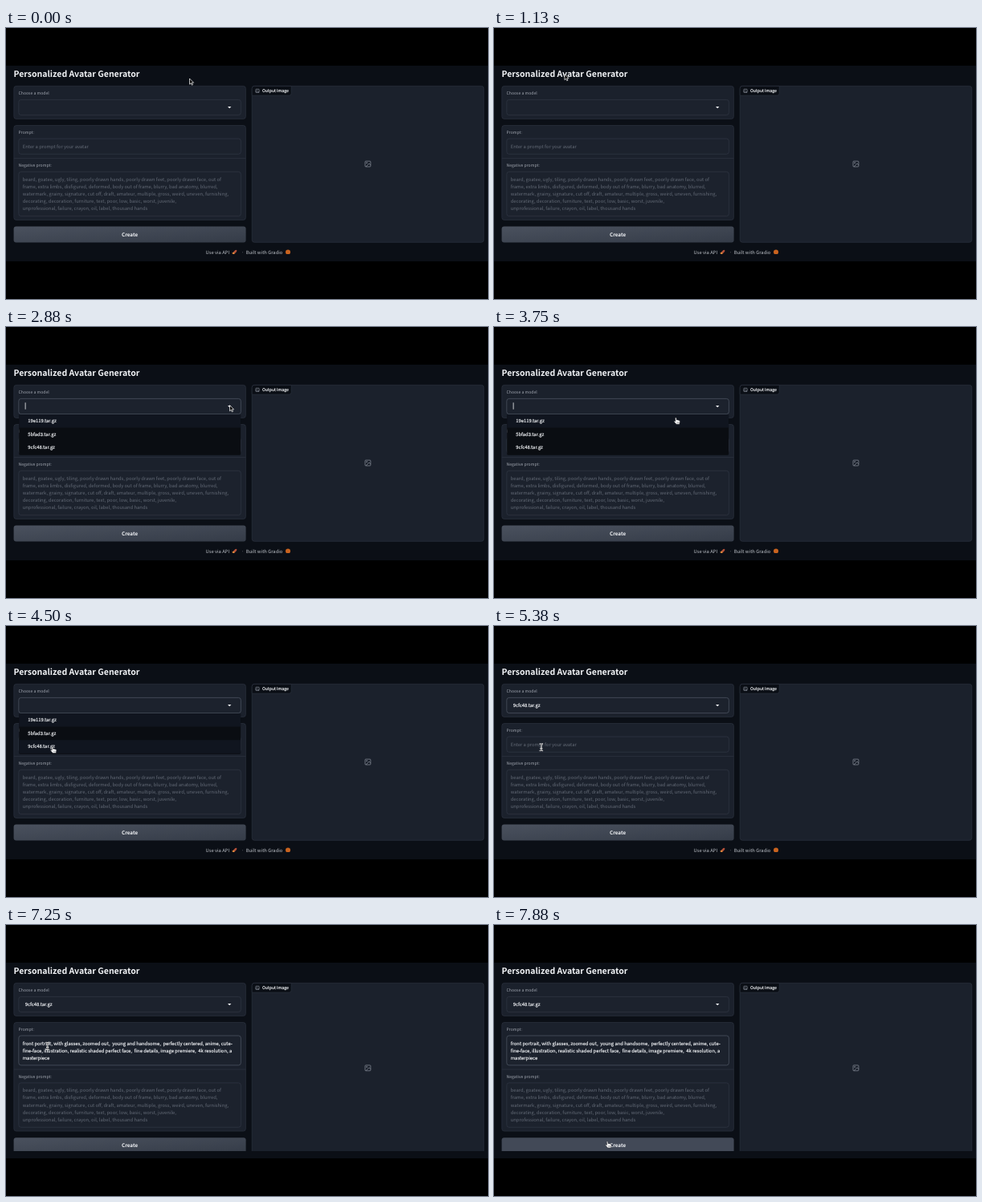
Write an HTML page that moves like this. It is 600 px wide and 338 px high and loops after 8000 ms.

```html
<!DOCTYPE html>
<html lang="en">
<head>
<meta charset="utf-8">
<title>Personalized Avatar Generator</title>
<style>
  html, body { margin: 0; width: 100%; height: 100%; overflow: hidden; background: #000; }
  svg { display: block; width: 600px; height: 338px; }
  text {
    font: 5.85px "Noto Sans CJK JP", "Noto Sans CJK SC", "Noto Sans CJK", "Open Sans", sans-serif;
    text-rendering: geometricPrecision;
    white-space: pre;
    fill: #f1f3f6;
  }
  .title { font-size: 10.5px; font-weight: 700; }
  .label { font-size: 5.1px; fill: #a3a8b2; }
  .hint { fill: #636a76; }
  .strong { stroke: #f1f3f6; stroke-width: .17px; }
  .foot { fill: #bcc0c7; }
  .create { font-size: 6.3px; font-weight: 700; text-anchor: middle; }
  .card { fill: #1b212c; stroke: #2f3643; stroke-width: .6; }
  .input { fill: #1c222d; stroke: #343b48; stroke-width: .6; }
  .input.focus { stroke: #596270; }
  .icon { fill: none; stroke: #8d939e; stroke-width: .7; stroke-linejoin: round; }
  .caret { fill: #f1f3f6; }
</style>
</head>
<body>
<svg viewBox="0 0 600 338">
  <defs>
    <linearGradient id="sheen" x2="1" y2="1">
      <stop stop-color="#4a515e"/><stop offset="1" stop-color="#353c48"/>
    </linearGradient>
    <clipPath id="view"><rect y="47" width="600" height="235"/></clipPath>
  </defs>
  <rect y="47" width="600" height="244" fill="#0b0f16"/>
  <g clip-path="url(#view)">
    <text class="title" x="9.5" y="61">Personalized Avatar Generator</text>

    <rect class="card" x="9.8" y="72.4" width="288.6" height="41" rx="3"/>
    <text class="label" x="15.6" y="83.1">Choose a model</text>
    <rect class="input" id="model" x="15.8" y="89.4" width="276.6" height="19.2" rx="3"/>
    <text class="strong" id="chosen" x="23.8" y="100.9">9cfc48.tar.gz</text>
    <path d="M276 97.9h4.4l-2.2 2.4z" fill="#f1f3f6"/>
    <rect class="caret" id="modelCaret" x="23.7" y="94.3" width=".8" height="8.4"/>

    <rect class="card" id="form" x="9.8" y="121.5" width="288.6" height="118" rx="3"/>
    <text class="label" x="15.6" y="132">Prompt:</text>
    <rect class="input" id="prompt" x="15.8" y="138" width="276.6" height="19.3" rx="3"/>
    <text class="hint" id="empty" x="20.7" y="149.8">Enter a prompt for your avatar</text>
    <g id="typed"></g>
    <rect class="caret" id="promptCaret" x="20.9" y="143.4" width=".8" height="8.4"/>

    <g id="lower">
      <path d="M9.8 162.5h288.6" stroke="#2f3643" stroke-width=".6"/>
      <text class="label" x="15.6" y="173">Negative prompt:</text>
      <rect class="input" x="15.8" y="179.3" width="276.6" height="55.4" rx="3"/>
      <g id="negative"></g>
      <rect id="button" x="9.6" y="247.6" width="289" height="19.8" rx="3"/>
      <text class="create" x="154.1" y="259.8">Create</text>
      <text class="foot" x="248.5" y="281.7">Use via API</text>
      <g transform="rotate(-45 284.7 279.6)">
        <ellipse cx="285.2" cy="279.6" rx="3" ry="1.3" fill="#b5523a"/>
        <path d="M281.5 278l2.2 .6v2l-2.2 .6z" fill="#e08a3c"/>
      </g>
      <text class="foot" x="292.8" y="281.7">·</text>
      <text class="foot" x="298.7" y="281.7">Built with Gradio</text>
      <circle cx="351" cy="279.5" r="3" fill="#c9631f"/>
    </g>

    <rect class="card" id="output" x="306.2" y="72.4" width="288.6" height="194.9" rx="3"/>
    <path d="M306.2 84.2V75.4a3 3 0 0 1 3-3H355.2V81.2a3 3 0 0 1-3 3z" fill="#0b0f16" stroke="#2f3643" stroke-width=".6"/>
    <g class="icon">
      <rect x="310.9" y="76.3" width="4.2" height="4.2" rx=".5"/>
      <path d="M311 79.6l1.4-1.3 2.6 2"/>
    </g>
    <text class="strong" style="font-size:5.1px" x="319" y="80.3">Output Image</text>
    <g class="icon" id="blank">
      <rect x="447" y="166.1" width="6.9" height="6.9" rx=".9"/>
      <circle cx="449.1" cy="168.2" r=".6"/>
      <path d="M448 173l4-4 1.9 1.9"/>
    </g>

    <g id="list">
      <rect x="16.3" y="109" width="275.8" height="50.8" rx="1.5" fill="#0a0d12"/>
    </g>

    <g id="arrow">
      <path d="M0 0V7.2L1.7 5.7 2.8 8.2 4 7.7 2.9 5.2H5.1z" fill="#0a0a0a" stroke="#fff" stroke-width=".7" stroke-linejoin="round"/>
    </g>
    <g id="hand">
      <path d="M-.8 .5C-.8-.5 .7-.5 .8 .5L1 2.8C1.8 2.3 2.5 2.5 2.7 3 3.3 2.7 4 2.9 4.1 3.5 4.9 3.4 5.3 3.8 5.2 4.7L4.6 7.9H.6L-2 4.9C-2.5 4-1.5 3.5-.4 4.5z" fill="#fff" stroke="#16191f" stroke-width=".5" stroke-linejoin="round"/>
      <path d="M1.6 5v1.7M2.7 5v1.7M3.7 5v1.7" stroke="#16191f" stroke-width=".35"/>
    </g>
    <g id="beam" fill="none" stroke-linecap="round">
      <path d="M-1.6-4Q0-4 0-3V3.6Q0 4.6-1.6 4.6M1.6-4Q0-4 0-3M0 3.6Q0 4.6 1.6 4.6M-.9 1.8H.9" stroke="#fff" stroke-width="1.5"/>
      <path d="M-1.5-4Q0-4 0-3V3.6Q0 4.6-1.5 4.6M1.5-4Q0-4 0-3M0 3.6Q0 4.6 1.5 4.6" stroke="#111" stroke-width=".45"/>
    </g>
  </g>
</svg>
<script>
  const $ = id => document.getElementById(id);
  const NS = 'http://www.w3.org/2000/svg';
  const LOOP = 8000, TICK = 125, GROW = 17.6;
  const OPEN = 2750, PICK = 4875, FOCUS = 6750, PASTE = 7250;

  function add(parent, tag, attrs, text = '') {
    const el = document.createElementNS(NS, tag);
    for (const key in attrs) el.setAttribute(key, attrs[key]);
    el.textContent = text;
    $(parent).append(el);
    return el;
  }

  function lines(parent, cls, y, rows) {
    rows.forEach((row, i) => add(parent, 'text', { class: cls, x: 20.7, y: y + i * 9.2 }, row));
  }

  lines('typed', 'strong', 149.8, [
    'front portrait, with glasses, zoomed out,  young and handsome,  perfectly centered, anime, cute-',
    'fine-face, illustration, realistic shaded perfect face,  fine details, image premiere,  4k resolution, a',
    'masterpiece'
  ]);
  lines('negative', 'hint', 190.6, [
    'beard, goatee, ugly, tiling, poorly drawn hands, poorly drawn feet, poorly drawn face, out of',
    'frame, extra limbs, disfigured, deformed, body out of frame, blurry, bad anatomy, blurred,',
    'watermark, grainy, signature, cut off, draft, amateur, multiple, gross, weird, uneven, furnishing,',
    'decorating, decoration, furniture, text, poor, low, basic, worst, juvenile,',
    'unprofessional, failure, crayon, oil, label, thousand hands'
  ]);
  const options = ['19e119.tar.gz', '5bfad3.tar.gz', '9cfc48.tar.gz'].map((name, i) => {
    const y = 109 + i * 16.6;
    const row = add('list', 'rect', { x: 16.3, y, width: 275.8, height: 16.6, fill: '#10151f' });
    add('list', 'text', { class: 'strong', x: 27.2, y: y + 10.2 }, name);
    return row;
  });

  // Pointer stops: time, x, y
  const stops = [
    [0, 228.5, 63], [900, 78, 60], [1250, 92, 56.5], [1750, 173, 88],
    [2250, 272.2, 97.6], [2625, 278.5, 97.6], [3125, 278.5, 97.6],
    [3500, 268, 104], [4375, 57.6, 150.6], [4875, 57.6, 150.6],
    [5000, 58.8, 151], [5375, 58.8, 151], [5800, 73, 150.5], [6200, 68, 151.5],
    [6625, 51.6, 150.6], [7375, 51.6, 150.6], [7875, 141, 270], [8000, 141, 270]
  ];

  function pointer(t) {
    let i = 1;
    while (i < stops.length - 1 && stops[i][0] <= t) i++;
    const [t0, x0, y0] = stops[i - 1], [t1, x1, y1] = stops[i];
    const p = (t - t0) / (t1 - t0), e = p * p * (3 - 2 * p);
    return [x0 + (x1 - x0) * e, y0 + (y1 - y0) * e];
  }

  const show = (id, on) => $(id).setAttribute('display', on ? 'inline' : 'none');
  const set = (id, key, value) => $(id).setAttribute(key, value);
  const blink = (t, from) => (t - from) % 1000 < 500;

  function draw(t) {
    const [x, y] = pointer(t);
    const open = t >= OPEN && t < PICK, pasted = t >= PASTE;
    const grow = pasted ? GROW : 0;

    show('list', open);
    options.forEach((row, i) => {
      const top = 109 + i * 16.6, over = y >= top && y < top + 16.6;
      row.setAttribute('opacity', i === 0 || over ? 1 : 0);
    });
    show('chosen', t >= PICK);
    show('modelCaret', t >= OPEN && t < FOCUS && blink(t, OPEN + (t >= PICK ? 2750 : 0)) && !(t >= PICK && t < 5500));
    show('promptCaret', t >= FOCUS && !pasted);
    set('model', 'class', t >= OPEN && t < FOCUS ? 'input focus' : 'input');
    set('prompt', 'class', t >= FOCUS ? 'input focus' : 'input');

    show('empty', !pasted);
    show('typed', pasted);
    set('prompt', 'height', 19.3 + grow);
    set('form', 'height', 118 + grow);
    set('output', 'height', 194.9 + grow);
    set('lower', 'transform', `translate(0 ${grow})`);
    set('blank', 'transform', `translate(0 ${grow / 2})`);

    const hover = pasted && y > 247.6 + grow;
    set('button', 'fill', hover ? '#424957' : 'url(#sheen)');

    const field = t >= PICK && y > 138 && y < 157.3 + grow || pasted && y > 197 && y < 252;
    const kind = open && y > 109 || hover ? 'hand' : field ? 'beam' : 'arrow';
    for (const id of ['arrow', 'hand', 'beam']) show(id, id === kind);
    set(kind, 'transform', `translate(${x} ${y})`);
  }

  const start = performance.now();
  function frame() {
    const t = (performance.now() - start) % LOOP;
    draw(Math.floor(t / TICK) * TICK);
    requestAnimationFrame(frame);
  }
  frame();
</script>
</body>
</html>
```
